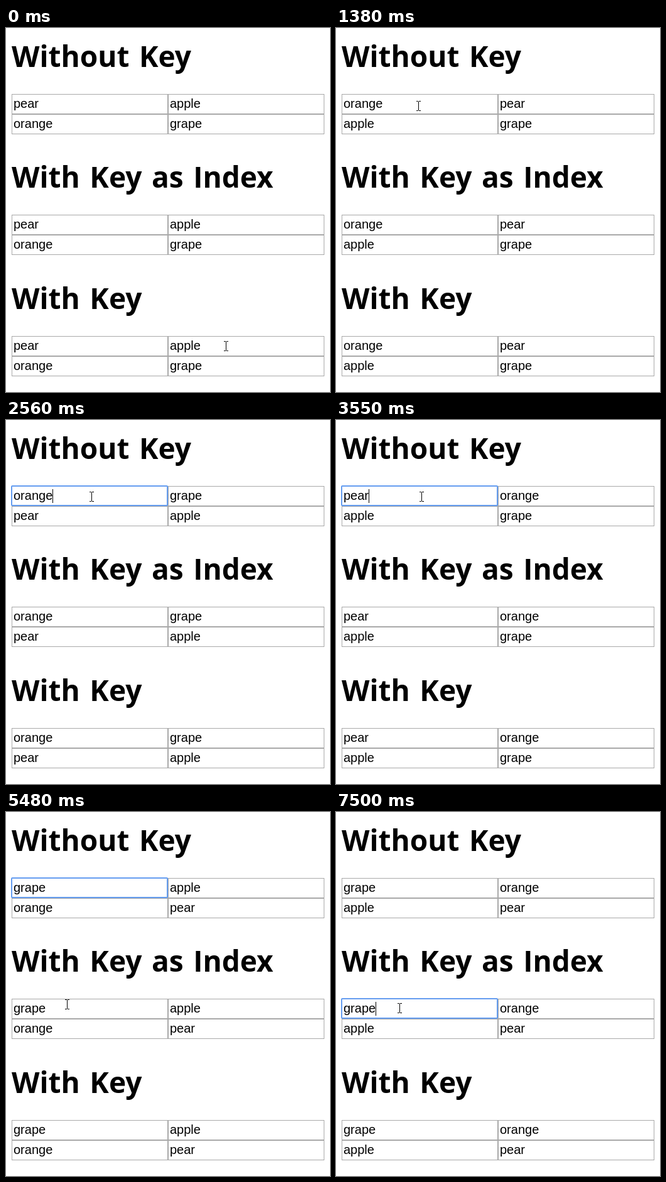
Write an HTML page that moves like this. It is 516x579 px and loops after 8000 ms.

```html
<!DOCTYPE html>
<html lang="en">
<head>
<meta charset="utf-8">
<title>List keys</title>
<style>
html, body { margin: 0; width: 100%; height: 100%; overflow: hidden; background: #fff; }
svg { display: block; width: 516px; height: 579px; }
.title { font: bold 46px "Open Sans", "Noto Sans", sans-serif; word-spacing: 3.7px; }
.word { font: 20px "Liberation Sans", Arial, sans-serif; white-space: pre; }
.box { fill: #fff; stroke: #a9a9a9; }
</style>
</head>
<body>
<svg id="stage" viewBox="0 0 516 579"></svg>
<script>
const LOOP = 8000;
const NS = "http://www.w3.org/2000/svg";
const stage = document.getElementById("stage");

function add(tag, attrs, text) {
  const el = document.createElementNS(NS, tag);
  for (const k in attrs) el.setAttribute(k, attrs[k]);
  if (text) el.textContent = text;
  stage.appendChild(el);
  return el;
}

const tables = [["Without Key", 105], ["With Key as Index", 297], ["With Key", 490]];

// Word order after each shuffle, row by row
const orders = [
  [0, "pear apple orange grape"],
  [560, "orange pear apple grape"],
  [1560, "apple pear orange grape"],
  [2560, "orange grape pear apple"],
  [3550, "pear orange apple grape"],
  [4560, "grape apple orange pear"],
  [5560, "grape pear orange apple"],
  [6490, "apple orange grape pear"],
  [7500, "grape orange apple pear"]
];

const focusTimes = [[0, -1], [1560, 0], [5710, 1]];

const blinks = [
  [0, 0], [1560, 1], [2080, 0], [2560, 1], [3090, 0], [3550, 1], [4100, 0],
  [4560, 1], [5060, 0], [5560, 1], [6260, 0], [6490, 1], [7040, 0], [7500, 1]
];

const ems = { orange: 3.113, grape: 2.557, apple: 2.446, pear: 2.001 };

const smooth = u => u * u * (3 - 2 * u);
const slowIn = u => 0.4 * u + 0.6 * smooth(u);
const slowOut = u => 1 - (1 - u) * (1 - u);

// Pointer moves: start, step length, step count, from, to, easing
const moves = [
  [70, 70, 12, [350, 506], [117, 181], slowIn],
  [920, 77, 7, [117, 181], [131, 123], slowOut],
  [1930, 77, 2, [131, 123], [136, 122], u => u],
  [4870, 76, 9, [136, 122], [97, 306], smooth],
  [5560, 80, 2, [97, 306], [101, 312], u => u]
];

const words = [];
for (const [title, top] of tables) {
  add("text", { class: "title", x: 9, y: top - 43 }, title);
  for (let i = 0; i < 4; i++) {
    const x = 9 + 249 * (i % 2), y = top + 32 * (i >> 1);
    add("rect", { class: "box", x: x + 0.5, y: y + 0.5, width: 248, height: 31 });
    words.push(add("text", { class: "word", x: x + 3, y: y + 22 }));
  }
}
const ring = add("rect", { x: 9, width: 248, height: 31, rx: 1, fill: "none", stroke: "#659df0", "stroke-width": 2 });
const caret = add("rect", { width: 1, height: 22 });
const pointer = add("path", {
  d: "M-3 -8h3v1h-3zM1 -8h3v1h-3zM0 -7h1v14h-1zM-3 7h3v1h-3zM1 7h3v1h-3z",
  "shape-rendering": "crispEdges"
});

function at(list, t) {
  let value = list[0][1];
  for (const [start, v] of list) if (t >= start) value = v;
  return value;
}

function pointerAt(t) {
  let pos = moves[0][3];
  for (const [start, step, count, from, to, ease] of moves) {
    if (t < start) break;
    const u = ease(Math.min(count, Math.floor((t - start) / step) + 1) / count);
    pos = from.map((a, i) => Math.round(a + (to[i] - a) * u));
  }
  return pos;
}

function render(t) {
  const order = at(orders, t).split(" ");
  words.forEach((el, i) => {
    const word = order[i % 4];
    if (el.textContent !== word) el.textContent = word;
  });
  const focus = at(focusTimes, t);
  const top = focus < 0 ? 0 : tables[focus][1];
  ring.setAttribute("y", top);
  ring.setAttribute("visibility", focus < 0 ? "hidden" : "visible");
  caret.setAttribute("x", Math.round(12 + 20 * ems[order[0]]));
  caret.setAttribute("y", top + 5);
  caret.setAttribute("visibility", focus >= 0 && at(blinks, t) ? "visible" : "hidden");
  pointer.setAttribute("transform", `translate(${pointerAt(t).join(" ")})`);
}

const begin = performance.now();
function tick() {
  render((performance.now() - begin) % LOOP);
  requestAnimationFrame(tick);
}
render(0);
requestAnimationFrame(tick);
</script>
</body>
</html>
```
